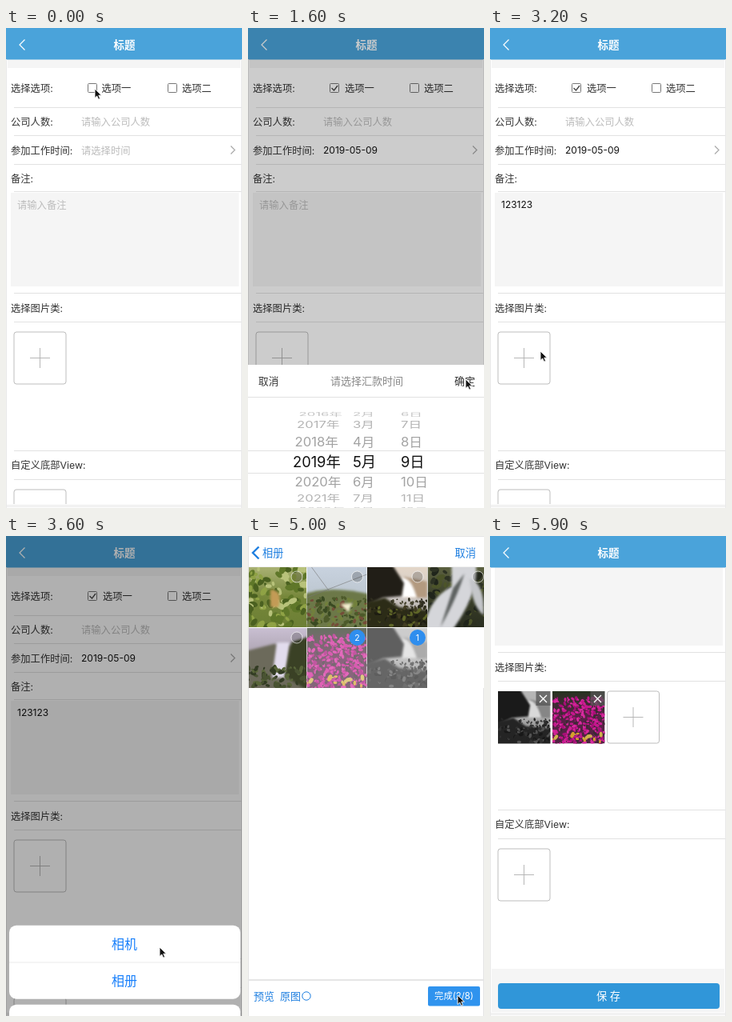
These frames come from a looping animation (295 by 600 pixels, 6000 ms). An HTML page:

```html
<!DOCTYPE html>
<html lang="zh-CN">
<head>
<meta charset="utf-8">
<title>表单</title>
<style>
html, body { margin: 0; width: 100%; height: 100%; overflow: hidden; background: #fff; }
svg { display: block; font-family: Inter, 'Noto Sans CJK SC', 'Noto Sans CJK', sans-serif; }
.soft { filter: blur(1.5px); }
.gray { filter: grayscale(1) brightness(.85); }
</style>
</head>
<body>
<svg id="stage" width="295" height="600"></svg>
<script>
const $ = id => document.getElementById(id);
const LOOP = 6000, STEP = 100, BLUE = '#1f7fe0', HINT = '#bcbcbc', LINE = '#e2e2e2';

// Markup helpers
const rect = (x, y, w, h, fill, more = '') => `<rect x="${x}" y="${y}" width="${w}" height="${h}" fill="${fill}" ${more}/>`;
const path = (d, stroke, width = 1, fill = 'none') => `<path d="${d}" fill="${fill}" stroke="${stroke}" stroke-width="${width}"/>`;
const circle = (x, y, r, fill, more = '') => `<circle cx="${x}" cy="${y}" r="${r}" fill="${fill}" ${more}/>`;
const text = (x, cy, str, size = 12.3, fill = '#333', more = '') =>
  `<text x="${x}" y="${cy + size * .37}" font-size="${size}" fill="${fill}" ${more}>${str}</text>`;
const group = (id, body) => `<g id="${id}">${body}</g>`;
const soft = (d, fill) => `<path class="soft" d="${d}" fill="${fill}"/>`;
const rule = (y, x = 10) => rect(x, y, 295 - x, 1, LINE);
const chevron = (x, y, w, h, color, width) => path(`M${x} ${y - h}l${w} ${h}l${-w} ${h}`, color, width);
const middle = 'text-anchor="middle"';

// Photos: a vertical gradient, soft shapes and seeded grain
const sky = (id, ...colors) => `<linearGradient id="${id}" x2="0" y2="1">` +
  colors.map((c, i) => `<stop offset="${i / (colors.length - 1)}" stop-color="${c}"/>`).join('') +
  '</linearGradient>' + rect(0, 0, 75, 75, `url(#${id})`);

let seed = 7;
const random = () => (seed = seed * 16807 % 2147483647) / 2147483647;
function grain(count, top, bottom, size, ...colors) {
  let out = '';
  for (let i = 0; i < count; i++) {
    const x = random() * 75, y = top + random() * (bottom - top), r = size * (.5 + random());
    out += `<ellipse rx="${r.toFixed(1)}" ry="${(r * .6).toFixed(1)}" fill="${colors[i % colors.length]}" ` +
      `transform="translate(${x.toFixed(1)} ${y.toFixed(1)}) rotate(${Math.round(random() * 180)})"/>`;
  }
  return out;
}

const cove = sky('dusk', '#e3d6c8', '#cfc9c6', '#8d8a7d') +
  soft('M46 12L75 18V38H46Z', '#b39a80') + soft('M42 14Q54 10 62 38H44Z', '#fff') +
  soft('M-5 -5H30L46 20L43 36L20 38L-5 50Z', '#211e17') + grain(40, 40, 50, 2, '#302e20', '#46442f') +
  soft('M-5 45L22 38L40 50L80 54V80H-5Z', '#2c2c17') +
  grain(90, 50, 75, 2.4, '#5f6628', '#1d1c12', '#413c22', '#2c2b1b');

const photos = [
  sky('leaf', '#a9b173', '#76873a', '#6c7f35') + grain(110, 0, 75, 4.5, '#4a6020', '#8fa245', '#b8c27b', '#5f7729') +
    soft('M30 28Q46 28 40 50H30Z', '#c39b56'),
  sky('hill', '#c8d2df', '#bcc6cf', '#4f6030') + soft('M-5 34Q30 22 80 34V80H-5Z', '#6c7848') +
    grain(130, 38, 75, 2.6, '#3a4a22', '#71803c', '#744d38', '#4d5a2a') + path('M6 0L28 30M0 38L75 9', '#777', .6) +
    soft('M42 46L57 45L52 56Z', '#f4f0d0'),
  cove,
  sky('gorge', '#5c6140', '#3a3f29', '#2a2e1f') + grain(80, 0, 75, 4, '#20251b', '#4c5429', '#2d3223') +
    soft('M30 -5H60Q66 30 30 80H-5Q0 40 30 24Z', '#d5d6da') + soft('M52 14Q72 20 70 60Q56 50 52 14Z', '#c4c6c9') +
    soft('M46 8Q36 40 16 75L32 26Z', '#5d6160'),
  sky('mist', '#c9bfd2', '#a9a0ac', '#4a4f34') + soft('M-5 30L34 20L80 24V80H-5Z', '#6c6a5b') +
    soft('M38 18H54L48 62H32Z', '#e2dced') + soft('M56 18L80 10V80L48 60Z', '#3a4125') +
    grain(70, 48, 75, 3, '#59663a', '#333c24', '#495332'),
  sky('bed', '#26331f', '#5a2147', '#4d2440') + grain(340, 10, 75, 2.4, '#c5168d', '#d72a9f', '#a80e78', '#cf1f95', '#3b2a33') +
    grain(14, 60, 73, 3, '#d5a02c', '#cfb34b'),
  `<g class="gray">${cove}</g>`
];
const photo = (i, x, y, size) => `<svg x="${x}" y="${y}" width="${size}" height="${size}" viewBox="0 0 75 75">${photos[i]}</svg>`;

// Form page
const checkbox = x => rect(x, 69.5, 11, 11, '#fff', 'stroke="#777" rx="1"');
const addBox = (id, y) => group(id, rect(10, y, 65, 65, '#fff', 'rx="3" stroke="#bdbdbd"') +
  path(`M30 ${y + 32.5}h25m-12.5 -12.5v25`, '#b0b0b0', .9));
const thumb = (i, x) => photo(i, x, 380, 65.5) + rect(x + 47.5, 380, 18, 18, '#555', 'opacity=".75"') +
  path(`M${x + 52} 385l9 9m0-9l-9 9`, '#fff', 1.3);

const content = rect(2, 39, 291, 11, '#f5f5f5') + [99, 134, 170, 204, 331, 367, 528, 564].map(y => rule(y)).join('') +
  text(6, 75.5, '选择选项:') + checkbox(102.5) + group('tick', path('M104.5 75l3 3l4.5 -6', '#444', 1.3)) +
  group('first', text(119.5, 75.5, '选项一')) + checkbox(202.5) + text(220, 75.5, '选项二') +
  text(6, 117.5, '公司人数:') + text(94, 117, '请输入公司人数', 12.3, HINT) +
  text(6, 153, '参加工作时间:') + group('noDate', text(94, 153, '请选择时间', 12.3, HINT)) +
  group('date', text(94, 152.5, '2019-05-09', 12, '#111')) + chevron(281, 152.5, 5, 5, '#aaa', 1.2) +
  text(6, 188.5, '备注:') + rect(6, 206, 285, 117, '#f5f5f5') +
  group('noNote', text(14, 221.5, '请输入备注', 12.3, HINT)) + text(14, 221, '', 12, '#111', 'id="note"') +
  text(6, 350, '选择图片类:') + group('thumbs', thumb(6, 10) + thumb(5, 78)) + addBox('add', 380) +
  text(6, 546.5, '自定义底部View:') + addBox('addBelow', 577) +
  rect(2, 727, 291, 60, '#f5f5f5') + rect(10, 745, 277, 32, '#3096d9', 'rx="4"') + text(148, 761, '保 存', 13.2, '#fff', middle);

const form = rect(0, 0, 295, 600, '#fff') + group('content', content) + rect(0, 0, 295, 39.5, '#4aa3da') +
  chevron(23.5, 21, -6.5, 6.5, '#fff', 1.2) + text(148, 21.5, '标题', 13.5, '#fff', middle + ' font-weight="600"') +
  rect(0, 595, 295, 5, '#f8f8f8') + path('M.5 39V600M294.5 39V600M0 597.5H295', '#e9e9e9');

// Date picker: rows wrapped around a drum
let drum = '';
for (let k = -3; k <= 3; k++) {
  const turn = k * .4, far = Math.abs(k), y = 542 + 64 * Math.sin(turn), scale = k ? .91 : 1;
  const shade = k ? 145 + far * 17 : 17;
  const cell = (x, str) => `<g transform="translate(${x} ${y}) scale(${scale} ${scale * Math.cos(turn)})">` +
    text(0, 0, str, 18.3, `rgb(${shade},${shade},${shade})`) + '</g>';
  drum += cell(56 + far * 2.5, 2019 + k + '年') + cell(131, 5 + k + '月') + cell(191, 9 + k + '日');
}
const picker = rect(0, 421, 295, 200, '#fff') + [461, 528, 556].map(y => rule(y, 0)).join('') + drum +
  text(13, 441, '取消', 12.7) + text(148.5, 441, '请选择汇款时间', 13, '#888', middle) + text(258, 441, '确定', 13);

// Action sheet, relative to its top edge
const sheet = rect(4, 0, 289, 92, '#fff', 'rx="9"') + rect(4, 46, 289, .7, LINE) + rect(4, 99, 289, 46, '#fff', 'rx="9"') +
  ['相机', '相册', '取消'].map((s, i) => text(148, 23 + i * 46 + (i > 1) * 7, s, 16, '#157efb', middle)).join('');

// Album
const spot = i => [-2 + i % 4 * 75.5, 39 + Math.floor(i / 4) * 76];
const tile = (_, i) => {
  const [x, y] = spot(i);
  return photo(i, x, y, 75) + circle(x + 63, y + 12, 7, '#000', 'fill-opacity=".2" stroke="#fff" stroke-opacity=".65"');
};
const badge = (n, i) => {
  const [x, y] = spot(i);
  return group('pick' + n, rect(x, y, 75, 75, '#fff', 'opacity=".3"') + circle(x + 63, y + 12, 10, '#2f8eee') +
    text(x + 63, y + 12, n, 10.5, '#fff', middle));
};
const tools = text(7, 575, '预览', 13, BLUE) + text(40, 575, '原图', 13, BLUE) + circle(73, 575, 5.2, 'none', `stroke="${BLUE}"`) +
  rect(0, 563, 0, 24.5, '#2f93ee', 'rx="2" id="done"') + text(0, 575, '', 11.3, '#fff', middle + ' id="doneText"');
const album = rect(0, 0, 295, 600, '#fff') + chevron(13.5, 21, -7.5, 7.5, BLUE, 2.4) + text(18, 21.5, '相册', 13.2, BLUE) +
  text(258.5, 21.5, '取消', 13.2, BLUE, 'font-weight="500"') + rect(0, 38.5, 295, .7, LINE) +
  photos.map(tile).join('') + badge(1, 6) + badge(2, 5) + rect(0, 554.5, 295, 1, '#ccc') + group('tools', tools) +
  path('M.5 0V600M294.5 190V600M0 .5H295', '#e4e4e4');

$('stage').innerHTML = group('form', form) + group('dim', rect(0, 0, 295, 600, '#000')) +
  group('picker', picker) + group('sheet', sheet) + group('album', album) +
  group('cursor', path('M0 0V11.5L2.7 9L4.6 13.2L6.6 12.3L4.8 8.2H8.4Z', '#fff', .9, '#111'));

// Timing helpers
function ease(t, begin, length) {
  const p = Math.min(1, Math.max(0, (t - begin) / length));
  return p * p * (3 - 2 * p);
}
const show = (id, on) => $(id).style.display = on ? '' : 'none';
const move = (id, x, y) => $(id).setAttribute('transform', `translate(${x} ${y})`);
const fade = (id, value) => $(id).setAttribute('opacity', value);

// Pointer stops: arrival time and place
const stops = [[0, 111, 76], [900, 190, 152], [1600, 272, 439], [2200, 110, 250], [3200, 63, 404],
  [3600, 192, 514], [4100, 153, 124], [4400, 211, 130], [4700, 136, 130], [5000, 262, 574]];
const pointerAt = t => stops.reduce(([x, y], [arrival, toX, toY]) => {
  const e = ease(t, arrival - 300, 300);
  return [x + (toX - x) * e, y + (toY - y) * e];
}, [0, 0]);

function draw(t) {
  const checked = t >= 200, dated = t >= 1600, added = t >= 5100;
  show('tick', checked);
  move('first', checked ? 1.5 : 0, 0);
  show('date', dated);
  show('noDate', !dated);
  const typed = Math.max(0, Math.floor((t - 2200) / 100));
  $('note').textContent = '123123'.slice(0, typed);
  show('noNote', !typed);
  show('thumbs', added);
  move('add', added ? 136.5 : 0, 0);
  move('content', 0, -186 * ease(t, 5400, 400));

  const pickerOpen = ease(t, 900, 300) - ease(t, 1600, 300);
  const sheetOpen = ease(t, 3300, 200) - ease(t, 3500, 300);
  const albumOpen = ease(t, 3600, 400) - ease(t, 5000, 400);
  move('picker', 0, 180 * (1 - pickerOpen));
  move('sheet', 0, 600 - 153 * sheetOpen);
  move('album', 0, 600 * (1 - albumOpen));
  fade('dim', .2 * pickerOpen + .42 * sheetOpen);

  const count = (t >= 4400) + (t >= 4700), width = count ? 65 : 41;
  show('pick1', count > 0);
  show('pick2', count > 1);
  fade('tools', count ? 1 : .55);
  fade('doneText', count ? 1 : .6);
  $('done').setAttribute('x', 290 - width);
  $('done').setAttribute('width', width);
  $('doneText').setAttribute('x', 290 - width / 2);
  $('doneText').textContent = count ? `完成(${count}/8)` : '完成';

  move('cursor', ...pointerAt(t));
  show('cursor', t < 5500);
}

const start = performance.now();
function tick(now) {
  const t = Math.max(0, now - start) % LOOP;
  draw(Math.floor(t / STEP) * STEP);
  requestAnimationFrame(tick);
}
draw(0);
requestAnimationFrame(tick);
</script>
</body>
</html>
```
